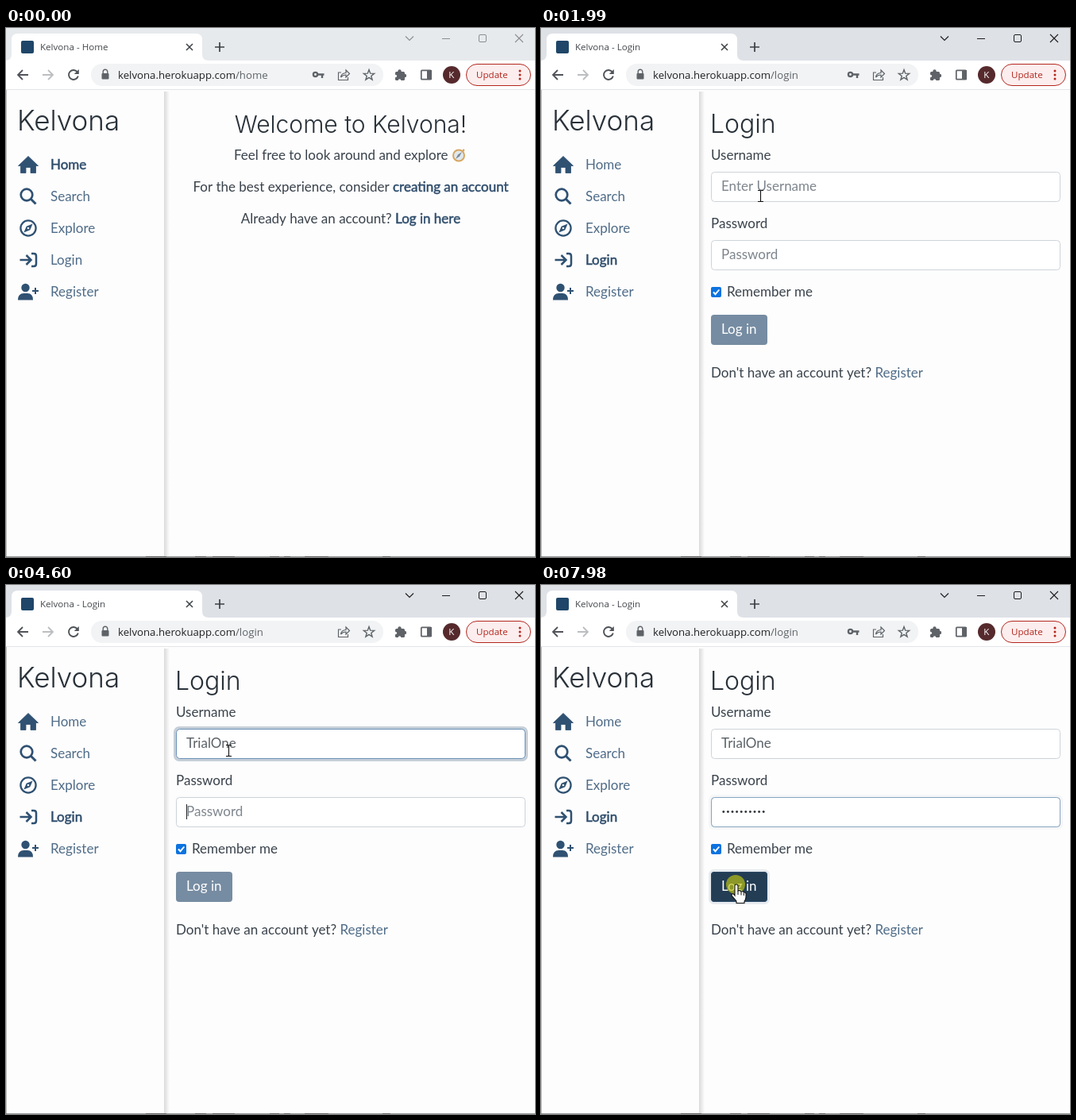
Write an HTML page with a canvas that moves like this. It is 666 by 666 pixels and loops after 8 s.

```html
<!DOCTYPE html>
<html lang="en">
<head>
<meta charset="utf-8">
<title>Kelvona</title>
<style>
html, body { margin: 0; width: 100%; height: 100%; overflow: hidden; background: #fff; }
canvas { display: block; width: 666px; height: 666px; }
</style>
</head>
<body>
<canvas id="stage" width="666" height="666"></canvas>
<script>
const ctx = document.getElementById('stage').getContext('2d');
const LOOP = 8000, STEP = 65;
const NAVY = '#2f5172', LINK = '#4f6c88', STRONG = '#2f4d6c';
const INK = '#39424b', TITLE = '#293139', GREY = '#5f6368';
const FIELD = '#5a6167', HINT = '#7d858c', ALERT = '#b3261e';
const BODY = '17px Lato, sans-serif';
const ui = size => `${size}px "Open Sans", sans-serif`;
const head = size => `300 ${size}px Inter, sans-serif`;

const BRAND = 'Kelvona', USER = 'TrialOne';
const HOST = BRAND.toLowerCase() + '.herokuapp.com';
const ACCOUNTS = ['a', 'Ned', 'TownLass', 'RainyMoon', 'PaddleEveryStream', 'MiChiamoLena'];
const USER_KEYS = [2980, 3140, 3340, 3540, 3810, 4010, 4210, 4400];
const PASS_KEYS = [5200, 5530, 5730, 5930, 6130, 6190, 6390, 6520, 6650, 6980];
const CLICKS = [[1000, 1190], [2060, 2190], [7930, 8000]];
// start, end, from x, from y, to x, to y
const MOVES = [
  [400, 790, 556, 600, 149, 307.5],
  [1390, 2040, 149, 307.5, 280, 208],
  [7310, 7570, 280, 208, 247, 366],
  [7700, 7895, 247, 366, 246, 377]
];

const clamp = v => Math.max(0, Math.min(1, v));
const ramp = (t, start, length = 150) => clamp((t - start) / length);
const typed = (keys, t) => keys.filter(k => t >= k).length;
const within = (t, a, b) => t >= a && t < b;

function text(str, x, y, font, color, bold) {
  ctx.font = font;
  ctx.fillStyle = color;
  ctx.fillText(str, x, y);
  const width = ctx.measureText(str).width;
  if (bold) {
    ctx.strokeStyle = color;
    ctx.lineWidth = 0.5;
    ctx.strokeText(str, x, y);
  }
  return x + width;
}

function centered(parts, y, font) {
  ctx.font = font;
  const total = parts.reduce((sum, p) => sum + ctx.measureText(p[0]).width, 0);
  parts.reduce((x, p) => text(p[0], x, y, font, p[1], p[2]), 434 - total / 2);
}

function box(x, y, w, h, r, fill, stroke, width = 1) {
  ctx.beginPath();
  ctx.roundRect(x, y, w, h, r);
  paint(fill, stroke, width);
}

function disc(x, y, r, fill, stroke, width = 1) {
  ctx.beginPath();
  ctx.arc(x, y, r, 0, Math.PI * 2);
  paint(fill, stroke, width);
}

function paint(fill, stroke, width) {
  if (fill) { ctx.fillStyle = fill; ctx.fill(); }
  if (stroke) { ctx.strokeStyle = stroke; ctx.lineWidth = width; ctx.stroke(); }
}

function shape(d, x, y, fill, stroke, width = 1) {
  const path = new Path2D(d);
  ctx.save();
  ctx.translate(x, y);
  if (fill) { ctx.fillStyle = fill; ctx.fill(path); }
  if (stroke) { ctx.strokeStyle = stroke; ctx.lineWidth = width; ctx.stroke(path); }
  ctx.restore();
}

function shadowed(color, blur, dy, draw) {
  ctx.save();
  ctx.shadowColor = color;
  ctx.shadowBlur = blur;
  ctx.shadowOffsetY = dy;
  draw();
  ctx.restore();
}

function drawTabs(t) {
  const active = t >= 1000, control = active ? '#1c1c1c' : '#8b8d90';
  ctx.fillStyle = active ? '#dee1e6' : '#e7eaed';
  ctx.fillRect(0, 0, 666, 41);
  shape('M-1 41 Q7 41 7 33 V15 Q7 7 15 7 H239 Q247 7 247 15 V33 Q247 41 255 41 Z', 0, 0, '#fff');
  box(19, 16, 16, 16, 2, '#1f4668');
  text(`${BRAND} - ${t < 1390 ? 'Home' : 'Login'}`, 43, 28, ui(11.6), '#45484c');
  shape('M-4 -4 L4 4 M4 -4 L-4 4', 231, 24, null, '#3c4043', 1.5);
  shape('M-6 0 H6 M0 -6 V6', 269, 24, null, '#3c4043', 1.7);
  shape('M-5 -2.5 L0 2.5 L5 -2.5', 508, 13, null, control, 1.1);
  shape('M-5 .5 H5', 554, 13, null, control);
  box(595.5, 8.5, 9, 9, 1.5, null, control);
  shape('M-5 -5 L5 5 M5 -5 L-5 5', 646, 13, null, control, 1.1);
}

function drawToolbar(t) {
  ctx.fillStyle = '#fff';
  ctx.fillRect(0, 41, 666, 37);
  ctx.fillStyle = '#e3e5e8';
  ctx.fillRect(0, 77, 666, 1);
  shape('M7 0 H-6 M0 -6 L-6 0 L0 6', 21, 59, null, '#50545a', 1.8);
  shape('M-7 0 H6 M0 -6 L6 0 L0 6', 53, 59, null, '#bcbec1', 1.8);
  shape('M5 -3.4 A6 6 0 1 0 5.8 1.5', 85, 59, null, '#50545a', 1.9);
  shape('M6.8 -7 V-1 H.8 Z', 85, 59, '#50545a');
  box(107, 45, 368, 28, 14, '#f1f3f4');
  box(120.5, 57, 9, 7.5, 1, GREY);
  shape('M-2.8 -2 V-4 A2.8 2.8 0 0 1 2.8 -4 V-2', 125, 59, null, GREY, 1.4);
  const end = text(HOST, 141, 64, ui(13.2), '#202124');
  text(t < 1130 ? '/home' : '/login', end, 64, ui(13.2), GREY);

  if (!within(t, 2980, 5200)) {
    disc(389.5, 58.5, 2.6, null, GREY, 2.3);
    shape('M-1 -.5 H7.5 M5 0 V4', 393, 59, null, GREY, 2.4);
  }
  shape('M-3 -3 H-6.5 V6.5 H5.5 V3 M-3.5 3 Q-3 -2 3 -2.5 V-6 L7.5 -1.5 L3 3 V0 Q-1 0 -3.5 3', 425, 59, null, GREY, 1.2);
  ctx.beginPath();
  for (let i = 0; i < 10; i++) {
    const a = -Math.PI / 2 + i * Math.PI / 5, r = i % 2 ? 2.9 : 7;
    ctx.lineTo(457 + r * Math.cos(a), 59.5 + r * Math.sin(a));
  }
  ctx.closePath();
  paint(null, GREY, 1.4);
  box(490, 55, 12, 11, 1.5, GREY);
  disc(495.5, 54.5, 2.2, GREY);
  disc(502, 60, 2.2, GREY);
  disc(490.3, 60.5, 1.8, '#fff');
  disc(495.5, 66, 1.8, '#fff');
  box(522.8, 53.3, 12.4, 11.4, 1, null, GREY, 1.7);
  ctx.fillStyle = GREY;
  ctx.fillRect(530, 53, 6, 12);
  disc(561, 59, 11, '#562a2d');
  text('K', 557.2, 63.3, ui(11.5), '#fff');
  box(579.5, 45.5, 81, 27, 13.5, '#fceeee', ALERT);
  text('Update', 592, 63, ui(11.6), ALERT);
  [54, 59, 64].forEach(y => disc(647, y, 1.5, ALERT));
}

const ICONS = [
  c => {
    shape('M0 -11 L12.5 1 H9.5 V10 H3 V3 H-3 V10 H-9.5 V1 H-12.5 Z', 28, 172.5, c, c, .8);
  },
  c => {
    disc(26, 210, 7.3, null, c, 2.7);
    shape('M3.5 3.5 L9.5 9.5', 28, 212, null, c, 3);
  },
  c => {
    disc(28, 252, 9.6, null, c, 2.3);
    shape('M5.6 -5.6 L2.3 2.3 L-5.6 5.6 L-2.3 -2.3 Z', 28, 252, c);
    disc(28, 252, 1.3, '#fff');
  },
  c => {
    shape('M-10.5 0 H3 M-2.5 -6 L3.5 0 L-2.5 6 M4 -8 H7 Q10 -8 10 -5 V5 Q10 8 7 8 H4', 28, 292, null, c, 2.5);
  },
  c => {
    disc(24.5, 327, 5.2, c);
    shape('M-13 10.5 Q-13 2 -5.5 2 H-1 Q6 2 6 10.5 Z', 28, 332, c);
    shape('M5 -1 H13 M9 -5 V3', 28, 332, null, c, 2);
  }
];

function drawSidebar(t) {
  const current = t < 1130 ? 0 : 3;
  const glow = ctx.createLinearGradient(199, 0, 206, 0);
  glow.addColorStop(0, 'rgba(0,0,0,.14)');
  glow.addColorStop(1, 'rgba(0,0,0,0)');
  ctx.fillStyle = glow;
  ctx.fillRect(199, 80, 7, 586);
  text(BRAND, 14, 129, head(35), TITLE);
  ['Home', 'Search', 'Explore', 'Login', 'Register'].forEach((label, i) => {
    const hover = i === 3 && within(t, 725, 1130);
    ICONS[i](hover ? '#23405a' : NAVY);
    text(label, 56, 178 + i * 40, BODY, hover || i === current ? STRONG : LINK, i === current);
  });
}

function drawHome() {
  centered([[`Welcome to ${BRAND}!`, TITLE]], 132, head(30));
  text('Feel free to look around and explore', 287, 166, BODY, INK);
  disc(570, 160.5, 7, '#dfe8ee', '#d8a662', 2);
  shape('M4 -4.5 L1 1 L-4 4.5 L-1 -1 Z', 570, 160.5, '#7b8794');
  disc(576, 154, 1.4, '#d8a662');
  centered([['For the best experience, consider ', INK], ['creating an account', STRONG, true]], 206, BODY);
  centered([['Already have an account? ', INK], ['Log in here', STRONG, true]], 246, BODY);
}

function drawField(y, focus, border) {
  if (focus > 0) box(212.5, y - 1.5, 443, 41, 5.5, null, `rgba(47,81,114,${.27 * focus})`, 3);
  box(214.5, y + .5, 439, 37, 4, '#fff', '#ced4da');
  ctx.globalAlpha = border;
  box(214.5, y + .5, 439, 37, 4, null, '#6992b8');
  ctx.globalAlpha = 1;
}

function caret(x, y) {
  ctx.fillStyle = '#222';
  ctx.fillRect(Math.round(x), y, 1, 19);
}

function drawButton(t) {
  const pressed = t >= 7930;
  if (pressed) box(212.5, 359.5, 74, 41, 5, null, 'rgba(47,81,114,.1)', 3);
  let fill = NAVY;
  if (pressed) fill = '#233d54';
  else if (t >= 5200) {
    fill = ctx.createLinearGradient(0, 361, 0, 399);
    fill.addColorStop(0, '#4b6c8a');
    fill.addColorStop(1, '#2d4f70');
  }
  ctx.globalAlpha = .65 + .35 * ramp(t, 5200, 130);
  box(214, 361, 71, 38, 4, fill);
  if (t >= 5200) box(214.5, 361.5, 70, 37, 4, null, '#294968');
  ctx.globalAlpha = 1;
  text('Log in', 227, 385, BODY, '#fff');
}

function drawLogin(t) {
  text('Login', 213, 132, head(32), TITLE);
  text('Username', 214, 166, BODY, INK);
  text('Password', 214, 252, BODY, INK);

  const userFocus = ramp(t, 2125, 125) - ramp(t, 4600, 130);
  const passFocus = ramp(t, 4600, 130) - ramp(t, 7930, 60);
  drawField(181, userFocus, userFocus);
  drawField(267, passFocus, t < 7930 ? passFocus : .7);

  const name = USER.slice(0, typed(USER_KEYS, t));
  const nameEnd = text(name || 'Enter Username', 227, 205, BODY, name ? FIELD : HINT);
  if (within(t, 2150, 2650) || within(t, 2980, 4600)) caret(name ? nameEnd : 227, 190);

  const dots = typed(PASS_KEYS, t);
  if (!dots) text('Password', 227, 291, BODY, HINT);
  for (let i = 0; i < dots; i++) disc(229.8 + i * 5.6, 285.5, 1.45, '#34393e');
  if (within(t, 4600, 7480)) caret(227 + dots * 5.6, 276);

  box(214, 326, 13, 13, 2, '#0b73e0');
  shape('M-3.5 0 L-1 2.7 L3.8 -3', 220.5, 332.5, null, '#fff', 1.9);
  text('Remember me', 234, 338, BODY, INK);
  drawButton(t);
  const end = text("Don't have an account yet? ", 214, 440, BODY, INK);
  text('Register', end, 440, BODY, LINK);
}

function drawPopup(items, width) {
  const height = items.length * 36 + 8;
  shadowed('rgba(0,0,0,.32)', 4, 1, () => box(313, 228, width, height, 4, '#fff'));
  shape('M-8 0 L0 -8 L8 0', 335, 228.5, '#fff', '#d5d8db');
  items.forEach((item, i) => text(item, 325, 255 + i * 36, ui(12), '#202124'));
}

function drawStatus() {
  shape('M0 643.5 H205 Q210 643.5 210 648.5 V666 H0 Z', 0, 0, '#dee1e6', '#d2d5da');
  text(`https://${HOST}/login`, 4, 659, ui(11.4), '#4a4d51');
}

function drawFrame() {
  ctx.fillStyle = '#9a9d9d';
  ctx.fillRect(0, 665, 666, 1);
  ctx.fillStyle = 'rgba(90,95,85,.4)';
  ctx.fillRect(0, 78, 1, 588);
  ctx.fillStyle = '#6a6a6a';
  [[176, 26], [238, 14], [260, 28], [332, 12], [350, 8], [376, 30], [474, 10]]
    .forEach(([x, w]) => ctx.fillRect(x, 665, w, 1));
}

function cursorAt(t) {
  const move = MOVES.filter(m => t >= m[0]).pop();
  if (!move) return null;
  const [start, end, x0, y0, x1, y1] = move;
  const snapped = Math.floor((t - start) / STEP) * STEP;
  const p = clamp(snapped / (end - start));
  const e = p * p * (3 - 2 * p);
  return [x0 + (x1 - x0) * e, y0 + (y1 - y0) * e];
}

const HAND = 'M-2 1.7 Q-2 0 0 0 Q2 0 2 1.7 V8 Q5 7 6 9 Q8.7 8.2 9.3 10 Q11.8 9.6 12 11.8 V16 Q11.8 19 10 21 V23.5 H0 V21 L-5.3 14.8 Q-6.8 12.4 -5 11.8 Q-3.6 11.6 -2 14 Z';

function drawCursor(t) {
  const pos = cursorAt(t);
  if (!pos) return;
  const [x, y] = pos;
  if (CLICKS.some(([a, b]) => within(t, a, b))) disc(x - 1, y, 12, 'rgba(190,196,18,.68)');
  const onLink = x < 200 && y > 160 && y < 352;
  const onButton = t > 7000 && x < 285 && y > 361;
  const onField = t > 1390 && x > 214 && ((y > 181 && y < 219) || (y > 267 && y < 305));
  if (onLink || onButton) {
    shape(HAND, x, y, '#fff', '#111', 1.1);
    shape('M2 8 V13 M6 9 V13.5 M9.3 10.5 V14', x, y, null, '#111');
  } else if (onField) {
    const beam = 'M-3.5 -7 H-1 Q0 -7 0 -6 Q0 -7 1 -7 H3.5 M0 -6 V6 M-3.5 7 H-1 Q0 7 0 6 Q0 7 1 7 H3.5';
    shape(beam, Math.round(x) + .5, Math.round(y) + .5, null, '#111', 1.1);
  } else {
    shape('M0 0 V17 L4 13.2 L6.7 19.3 L9.2 18.2 L6.6 12.3 H12 Z', x, y, '#fff', '#111');
  }
}

function draw(t) {
  ctx.fillStyle = '#fdfdfd';
  ctx.fillRect(0, 0, 666, 666);
  drawTabs(t);
  drawToolbar(t);
  drawSidebar(t);
  if (t < 1130) drawHome();
  else drawLogin(t);
  if (within(t, 2190, 2980)) drawPopup(ACCOUNTS, 156);
  if (within(t, 2980, 3340)) drawPopup([USER, USER + 'More'], 119);
  drawFrame();
  if (within(t, 1060, 1580)) drawStatus();
  drawCursor(t);
}

const origin = performance.now();
function tick() {
  draw((performance.now() - origin) % LOOP);
  requestAnimationFrame(tick);
}
tick();
</script>
</body>
</html>
```
